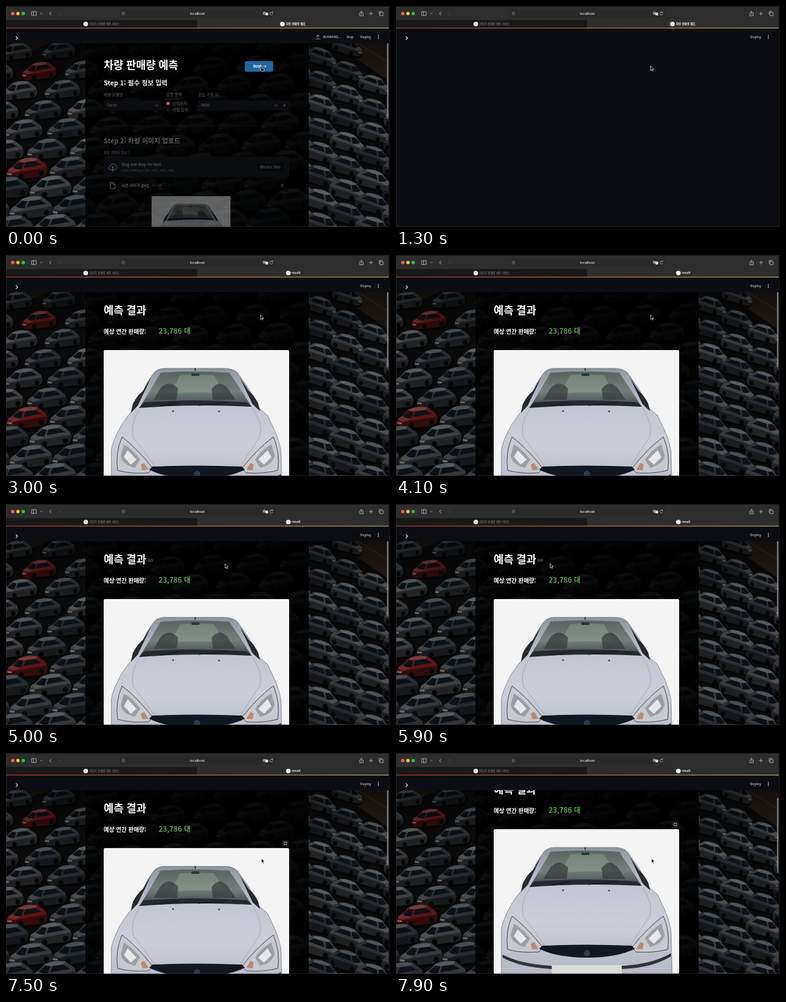
Write an HTML page that moves like this. It is 609 px wide and 351 px high and loops after 8 s.

```html
<!DOCTYPE html>
<html lang="ko">
<head>
<meta charset="utf-8">
<title>차량 판매량 예측</title>
<style>
  html, body { margin: 0; width: 100%; height: 100%; overflow: hidden; background: #0b0d12; }
  svg { display: block; width: 609px; height: 351px; }
  text { font-family: "Noto Sans CJK KR", "Noto Sans CJK", "Noto Sans", sans-serif; white-space: pre; }
  .ui { font-family: Inter, "Noto Sans CJK KR", sans-serif; }
  .line { fill: none; stroke: #b9b9ba; stroke-width: .8; stroke-linecap: round; stroke-linejoin: round; }
</style>
</head>
<body>
<svg id="stage" viewBox="0 0 609 351"></svg>
<script>
const LOOP = 8000, BLANK = 1000, RESULT = 2700;

const text = (x, y, s, size, fill = '#fff', weight = 400, extra = '') =>
  `<text x="${x}" y="${y}" font-size="${size}" fill="${fill}" font-weight="${weight}" ${extra}>${s}</text>`;
const box = (x, y, w, h, fill, r = 0, extra = '') =>
  `<rect x="${x}" y="${y}" width="${w}" height="${h}" rx="${r}" fill="${fill}" ${extra}/>`;
const dot = (x, y, r, fill) => `<circle cx="${x}" cy="${y}" r="${r}" fill="${fill}"/>`;
const path = (d, fill, extra = '') => `<path d="${d}" fill="${fill}" ${extra}/>`;
const line = (d, extra = '') => `<path class="line" d="${d}" ${extra}/>`;

// One parked car, centred on its own origin
const parked = (x, y, scale, turn, color, flip = 1) =>
  `<g transform="translate(${x} ${y}) rotate(${turn}) scale(${flip * scale} ${scale * 1.12})" color="${color}">
    ${path('M-31 8L-28 16H26L34 7V1Z', '#040506')}
    ${path('M-30 5L-27-1Q-17-5-12-11Q2-16 17-12L28-3L30 4Q29 11 23 12L-21 13Q-30 12-30 5Z', 'currentColor')}
    ${path('M-27 5L28 1L30 5Q29 11 23 12L-21 13Q-29 12-30 6Z', '#000', 'opacity=".45"')}
    ${path('M-11-11Q2-15 16-12L14-9L-8-8Z', '#c9d2d8', 'opacity=".22"')}
    ${path('M-28 0Q-22-4-18-4L-9 1L-20 4Z', '#c9d2d8', 'opacity=".13"')}
    ${path('M-20-3L-10-9L-4-8L-8 0Q-15 1-20-3ZM-5-1L-1-8L13-8.500L22-3Z', '#0b1116')}
    ${path('M-29 4L-22 5L-23 7L-29 6Z', '#6d6c66')}
    ${dot(-9, 10, 3.8, '#060708')}${dot(21, 8, 3.600, '#060708')}
  </g>`;

function lot() {
  const tones = ['#35383b', '#2b2f33', '#3c3e3f', '#262a2f'];
  const tone = k => tones[(k % 4 + 4) % 4];
  let left = '', right = '';
  for (let j = 0; j < 10; j++) {
    const shift = (83 - 31 * j + 680) % 68;
    for (let i = -1; i < 7; i++) {
      const red = (j === 1 || j === 6) && i === 0;
      left += parked(shift + 68 * i, 72 + 31 * j - i * 2, .88 + j * .035, -5, red ? '#5a1517' : tone(i * 3 + j * 5));
    }
  }
  for (let j = -1; j < 8; j++) {
    for (let i = -1; i < 4; i++) {
      if (i - j > 2) continue;
      right += parked(500 + 42 * i, 80 + 38 * j + 22 * i, .86 + j * .03, 14, tone(i + j * 3), -1);
    }
  }
  return box(0, 36, 609, 315, '#0b0a0a') +
    path('M0 59H70L28 74L0 80Z', '#1d1612') + left +
    `<g clip-path="url(#east)">${box(480, 36, 129, 315, '#0b0a0a')}
      ${path('M520 59H609V120Z', '#231a15')}${path('M558 59L609 91', 'none', 'stroke="#4a3823" stroke-width="1"')}${right}</g>` +
    box(0, 59, 609, 80, 'url(#dusk)') + box(126, 59, 354, 292, '#000', 0, 'opacity=".84"');
}

// Large photo card; its top left corner is at 155,151
const photo = `<g clip-path="url(#card)">
  ${box(154.800, 150.800, 294.4, 230, '#f4f4f5')}
  ${path('M233 189Q238 181 250 180H346Q360 180 367 187L386 214L398 240L415 255L421 268Q431 287 436 310L438 381H167V310Q169 296 183 270L195 253L208 240L223 204Z', 'url(#paint)', 'stroke="#555960" stroke-width=".6"')}
  ${path('M231 193L209 239L198 251L201 237Q208 223 217 216ZM371 195L391 237L403 248L400 236Q393 222 385 216Z', '#262a2e')}
  ${path('M245 187Q300 183 354 187Q372 212 389 240Q300 233 212 242Q230 213 245 187Z', 'url(#glass)')}
  ${path('M276 191Q300 189 330 191L346 220Q310 216 262 220Z', '#91a596', 'opacity=".45"')}
  ${path('M244 213Q257 196 273 212L271 230H234ZM326 213Q338 196 352 212L364 230H328Z', '#343a3b', 'opacity=".7"')}
  ${path('M211 243L219 234Q300 228 382 234L390 241Q300 236 211 243Z', '#25282c')}
  ${path('M245 239L275 235M305 239L352 234', 'none', 'stroke="#111419" stroke-width="1.200"')}
  ${box(294, 188, 13, 4, '#303638', 1.5)}
  ${box(299, 179.5, 2, 4.5, '#34383c', 1)}
  ${path('M211 246Q196 270 202 290Q220 312 236 336M391 244Q409 270 402 290Q386 312 372 336', 'none', 'stroke="#9da2ad" stroke-width=".8"')}
  ${dot(265, 248, 1.300, '#33383f')}${dot(338, 248.500, 1.300, '#33383f')}
  ${path('M184 289Q207 306 233 339L226 346Q198 348 177 342Q173 314 184 289ZM424 289Q400 306 374 339L381 346Q408 348 431 342Q435 314 424 289Z', '#c6c9ce', 'stroke="#454950" stroke-width="1"')}
  ${path('M187 301Q201 309 213 325L204 338Q184 333 182 319ZM421 301Q406 309 395 325L403 338Q423 333 426 319Z', '#83888f', 'opacity=".65"')}
  ${path('M193 310L207 325L198 333L187 321ZM415 310L400 325L409 333L421 321Z', '#e6e8ea')}
  ${path('M214 333L219 330L226 341L216 342ZM393 333L388 330L381 341L391 342Z', '#b98975')}
  ${path('M232 336Q303 333 374 336L379 341Q350 355 303 355Q255 355 227 341Z', '#12171f')}
  ${dot(303, 348, 5, '#303a4c')}
  ${path('M169 350Q196 365 246 368H360Q407 365 436 348V353Q407 371 360 373H246Q196 370 169 355Z', '#30343a')}
  ${box(247, 367, 111, 14, '#dcdcda')}
</g>`;

const arrow = path('M0 0V7L1.600 5.500L2.700 8L4 7.400L2.900 5.100H5Z', '#060606', 'stroke="#fff" stroke-width=".65"');
const hand = path('M1 0Q2 0 2 1V3.500L5 4Q6 4.300 5.800 5.500L5 8.500H1.700L-.8 5.500Q-.5 4.400 .2 5V1Q.2 0 1 0Z', '#060606', 'stroke="#fff" stroke-width=".65"');

const form = () => {
  const dim = '#646466', faint = '#404144', field = '#0b0c10';
  return text(155, 100.2, '차량 판매량 예측', 16.85, '#fff', 700) +
    box(378.800, 87.600, 45, 17, '#2068a3', 2.5) + text(392, 98.3, 'Next →', 5.9, '#fff', 600) +
    text(155, 125.8, 'Step 1: 필수 정보 입력', 10.35, '#f2f2f2', 600) +
    text(155, 143.2, '차량 모델명', 6.2, dim, 500) + text(254, 143.2, '입력 방식', 6.3, dim, 500) +
    text(305, 143.2, '진입 가격 ($)', 6, dim, 500) +
    box(155, 150, 92, 15.5, field, 3) + text(160, 160.2, 'Tarvo', 6.1, dim, 500) +
    line('M237 157l2 2 2-2', 'style="stroke:#77777a"') +
    dot(257, 154.700, 3.1, '#8c302f') + dot(257, 154.700, 1.2, '#b9a5a5') + text(264, 157, '선택하기', 6.2, dim, 500) +
    dot(257, 165, 3, '#14161b') + text(264, 167.3, '직접 입력', 6.2, dim, 500) +
    box(305, 150, 144, 15.5, field, 3) + text(309, 160.2, '9830', 6.2, dim, 500) +
    line('M426 157.800h4M440 157.800h3M441.500 156.300v3', 'style="stroke:#6c6c6f"') +
    box(155, 190, 294, .7, '#121316') +
    text(155, 217.8, 'Step 2: 차량 이미지 업로드', 10.45, '#5c5c5e', 600) +
    text(155, 234.5, '차량 이미지 업로드', 5.3, '#565658', 500) +
    box(155, 239, 294, 32.5, field, 3) +
    line('M165.500 260H173Q177 259 175.500 255.500Q174 250 169.500 250.500Q165.500 251 165 254.500Q161 256 163.500 259.300ZM169.500 263V255M167.300 257l2.200-2.200 2.200 2.200', 'style="stroke:#68686b"') +
    text(183, 253.6, 'Drag and drop file here', 5.8, '#6b6b6d', 500) +
    text(183, 263.2, 'Limit 200MB per file • JPG, JPEG, PNG', 4.75, faint) +
    box(398, 248.500, 43, 14.5, '#07080a', 3, 'stroke="#131418" stroke-width=".5"') +
    text(403, 257.8, 'Browse files', 5.75, '#646466', 500) +
    line('M166 280.500H170L173 283.500V290H166ZM170 280.500V283.500H173', 'style="stroke:#77777a"') +
    text(183, 287, '시연 이미지.jpeg', 6.1, '#78787a', 500) + text(231, 286.8, '19.1KB', 5, faint) +
    line('M435.800 283l4 4m0-4l-4 4', 'style="stroke:#737376"') +
    `<g transform="translate(231 302) scale(.425) translate(-155 -151)" opacity=".39">${photo}</g>`;
};

const result = () =>
  text(155, 94, '예측 결과', 17, '#fff', 700) +
  `<g id="link">${line('M227.800 91.300h-.8a1.800 1.800 0 0 1 0-3.600h.8M229.800 87.700h.8a1.800 1.800 0 0 1 0 3.600h-.8M227.500 89.500h2.600', 'style="stroke:#8a8b90"')}</g>` +
  text(155, 125.4, '예상 연간 판매량:', 9.2, '#fff', 700) +
  text(242, 125.4, '23,786 대', 11.3, '#5ca24f', 700) + photo +
  `<g id="expand">${box(437.500, 138, 11, 11, '#191b21', 2)}
    ${line('M441 142.800v-1.300h1.300M443.700 141.500H445v1.300M445 144.200v1.300h-1.300M442.300 145.500H441v-1.300', 'style="stroke:#d0d0d2"')}</g>`;

const chrome = () =>
  box(0, 0, 609, 23, '#2d2d2e') + box(0, 0, 609, 1, '#141414') +
  ['#ff5f57', '#febc2e', '#28c840'].map((c, i) => dot(10.7 + 8.3 * i, 12, 2.7, c)).join('') +
  line('M41 9h7v6h-7zM43.500 9v6M54.800 11.500l1.200 1.200 1.200-1.200M71.500 9.500L69 12l2.500 2.500') +
  line('M84 9.500l2.500 2.500-2.500 2.500', 'style="stroke:#555"') +
  box(180, 6, 247, 12, '#29292a', 3) +
  line('M184 10h4.500M184 12h4.500M184 14h2M187.300 14h1.200', 'style="stroke:#999;stroke-width:.6"') +
  text(303.5, 13.9, 'localhost', 5.3, '#f0f0f0', 500, 'class="ui" text-anchor="middle"') +
  box(407.500, 9.2, 4.5, 4.5, '#8d8d8e', 1) + box(411.300, 10.500, 4.500, 4.500, '#dedede', 1) +
  line('M422.600 10.500A2.300 2.300 0 1 0 423 13M421.400 10.400h1.500V9') +
  line('M562 11h-1v4.500h5.500V11h-1M563.700 13.500V8.500M562.300 9.800l1.400-1.400 1.400 1.400M576.200 12h5.400M578.900 9.300v5.400M593.500 10.300h4.500v5h-4.500zM591.800 13.500V8.700h4.500') +
  box(0, 23, 303, 12, '#191919') + box(303, 23, 306, 12, '#2d2d2e') + box(0, 22.600, 303, .6, '#111') +
  dot(126.5, 28.6, 3.7, '#e9e9e9') + text(132, 30.3, '자동차 판매량 예측 서비스', 4.4, '#8d8d8d') +
  `<g id="tabForm">${dot(438.3, 28.6, 3.7, '#f2f2f2')}${text(444, 30.3, '차량 판매량 예측', 4.4, '#f2f2f2', 700)}</g>
   <g id="tabResult">${dot(447.8, 28.6, 3.7, '#f2f2f2')}${text(453.2, 30.3, 'result', 4.8, '#f2f2f2', 700)}</g>` +
  box(0, 34.500, 607, 1.200, 'url(#stripe)');

const header = () =>
  box(0, 35, 609, 24, '#0b0d13') +
  line('M16 48.700l2.400 2.300-2.400 2.300', 'style="stroke:#f0f0f0;stroke-width:1.100"') +
  text(562, 51.3, 'Deploy', 5.2, '#efefef', 500) +
  [46.8, 49.2, 51.6].map(y => dot(590.5, y, .75, '#eee')).join('') +
  `<g id="running"><g id="runner"></g>${text(503, 51.4, 'RUNNING...', 5.3, '#efefef', 500)}${text(540, 51.4, 'Stop', 5.1, '#efefef', 500)}</g>`;

const stop = (at, color, alpha = 1) => `<stop offset="${at}" stop-color="${color}" stop-opacity="${alpha}"/>`;
document.getElementById('stage').innerHTML = `
  <defs>
    <linearGradient id="stripe">${stop(0, '#a93a38')}${stop(.5, '#b9713f')}${stop(1, '#b5a65c')}</linearGradient>
    <linearGradient id="paint" x2="0" y2="1">${stop(0, '#8e949c')}${stop(.3, '#c3c6d2')}${stop(.6, '#cbcdd9')}${stop(1, '#b4b8c3')}</linearGradient>
    <linearGradient id="glass" x2="0" y2="1">${stop(0, '#596360')}${stop(.55, '#75807d')}${stop(1, '#3d4446')}</linearGradient>
    <linearGradient id="dusk" x2="0" y2="1">${stop(0, '#000', .45)}${stop(1, '#000', 0)}</linearGradient>
    <clipPath id="card"><rect x="154.800" y="150.800" width="294.4" height="230" rx="3"/></clipPath>
    <clipPath id="view"><rect y="59" width="609" height="292"/></clipPath>
    <clipPath id="east"><rect x="480" y="59" width="129" height="292"/></clipPath>
  </defs>
  ${box(0, 0, 609, 351, '#0b0d12')}
  <g clip-path="url(#view)">
    <g id="lot">${lot()}</g>
    <g id="form">${form()}</g>
    <g id="result">${result()}</g>
    <g id="thumb">${box(604.200, 59, 2.400, 119, '#77787b', 1.200)}</g>
  </g>
  ${header()}${chrome()}
  ${box(607, 0, 2, 351, '#101011')}${box(0, 0, .5, 351, '#303033')}${box(0, 350.400, 609, .6, '#242529')}
  <g id="cursor"><g id="hand">${hand}</g><g id="arrow">${arrow}</g></g>`;

// Rows: time, values
const CURSOR = [[0, 403.7, 95.3], [4600, 403.7, 95.3], [5600, 244.3, 94.3], [6300, 244.3, 94.3], [7200, 405.2, 167.5]];
const SCROLL = [[0, 0], [7550, 0], [7900, 30]];

function at(track, t) {
  const k = track.findIndex(row => row[0] > t);
  if (k < 0) return track[track.length - 1].slice(1);
  const a = track[k - 1], b = track[k];
  const p = (t - a[0]) / (b[0] - a[0]), e = p * p * (3 - 2 * p);
  return a.slice(1).map((v, i) => v + (b[i + 1] - v) * e);
}

const $ = id => document.getElementById(id);
const show = (id, on) => { $(id).style.display = on ? '' : 'none'; };
const move = (id, x, y) => $(id).setAttribute('transform', `translate(${x} ${y})`);
const poses = [
  'M490.500 52.500h8M493 46.500h3M494.500 46.500l-1 3 2.500 2.500M492 49l2-1.500 3 1',
  'M490.500 52.500h8M492.500 46h2.500M494 46.500v3l-2 2.500M494 48l3-1M494 49.500l3 2.500',
  'M490.500 52.500h8M494 45.500h2.500M495 46l-2 3.500 1 2.500M491.500 47.500l3 .500 3-1.500'
].map(d => line(d, 'style="stroke:#999;stroke-width:.7"'));

let pose = -1;
function draw(now) {
  const t = now % LOOP;
  const first = t < BLANK, last = t >= RESULT;
  const [x, y] = at(CURSOR, t), [scroll] = at(SCROLL, t);
  show('lot', first || last);
  show('thumb', first || last);
  show('form', first);
  show('running', first);
  show('hand', first);
  show('arrow', !first);
  show('result', last);
  show('tabForm', !last);
  show('tabResult', last);
  show('link', t > 4600 && y < 104);
  show('expand', y > 151);
  move('cursor', x, y);
  move('result', 0, -scroll);
  move('thumb', 0, scroll * .41);
  const next = Math.floor(t / 200) % poses.length;
  if (next !== pose) $('runner').innerHTML = poses[pose = next];
}

const start = performance.now();
function tick() {
  draw(performance.now() - start);
  requestAnimationFrame(tick);
}
tick();
</script>
</body>
</html>
```
